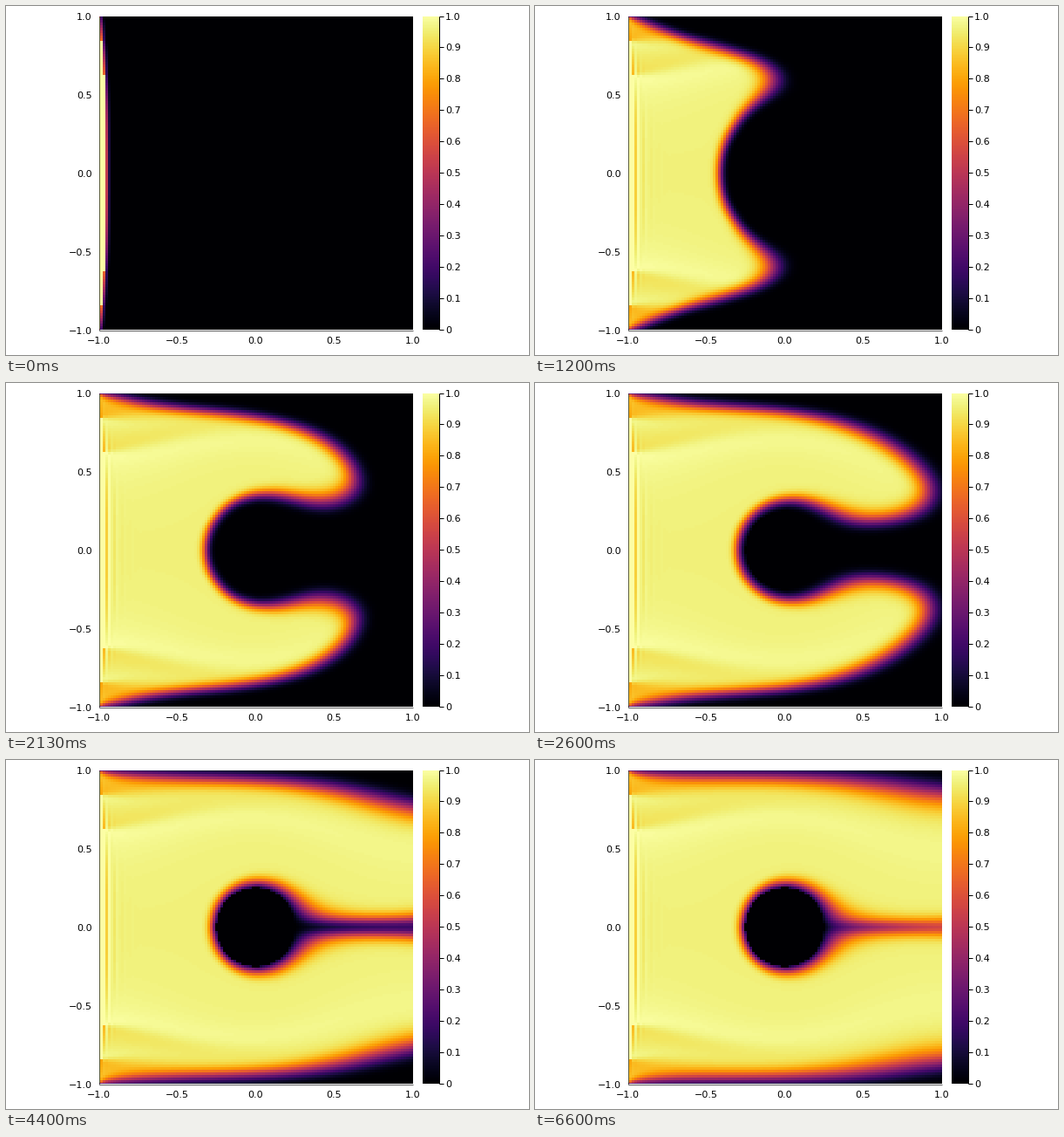
Recreate the animation shown at these times as a matplotlib script. Size 600x400 px, loop 6670 ms.

```python
import numpy as np
import matplotlib.pyplot as plt
from matplotlib.animation import FuncAnimation

W, H = 600, 400
FRAMES, LOOP = 100, 6670
N = 120                # grid intervals per side
D = 2 / N
R = 0.25               # cylinder radius
U, P = 0.0452, 2.8     # inlet speed per frame and profile power
K = 0.165              # diffusion per frame, in cells squared


# Stokes flow past a cylinder in a channel, as a series fitted to its walls
def basis(x, y):
    r = np.maximum(np.hypot(x, y), 0.2)
    t = np.arctan2(y, x)
    cols = []
    for n in range(1, 32, 2):
        s = np.sin(n * t)
        grow, decay = (r / 1.2) ** n, (R / r) ** n
        last = r * np.log(r) if n == 1 else decay * r * r
        cols += [grow * s, grow * r * r * s, decay * s, last * s]
    return np.stack(cols, axis=-1)


def flow_basis(x, y, h=1e-4):
    u = (basis(x, y + h) - basis(x, y - h)) / (2 * h)
    v = (basis(x - h, y) - basis(x + h, y)) / (2 * h)
    return u, v


def fit_flow():
    s = np.linspace(0, 1, 90)
    one, zero = np.ones_like(s), np.zeros_like(s)
    a = s * np.pi / 2
    x = np.concatenate([R * np.cos(a), s, one])
    y = np.concatenate([R * np.sin(a), one, s])
    psi = np.concatenate([zero, one - 1 / (P + 1), s - s ** (P + 1) / (P + 1)])
    u = np.concatenate([zero, zero, 1 - s ** P])
    A = np.concatenate([basis(x, y), *flow_basis(x, y)])
    b = np.concatenate([psi, u, np.zeros_like(u)])
    scale = np.linalg.norm(A, axis=0)
    return np.linalg.lstsq(A / scale, b, rcond=None)[0] / scale


coef = fit_flow()


def in_cylinder(x, y):
    return np.hypot(x, y) < R + 0.001


def velocity(x, y):
    x, y = np.clip(x, -1, 1), np.clip(y, -1, 1)
    u, v = (U * (f @ coef) for f in flow_basis(x, y))
    still = in_cylinder(x, y) | (np.abs(y) > 1 - 1e-9)
    return np.where(still, 0, u), np.where(still, 0, v)


def cell(p):
    g = np.clip((p + 1) / D, 0, N)
    i = np.minimum(g.astype(int), N - 1)
    return i, g - i


def diffuse(c):
    p = np.pad(c, 1)
    around = p[:-2, 1:-1] + p[2:, 1:-1] + p[1:-1, :-2] + p[1:-1, 2:]
    return c + K * (around - 4 * c)


# Diffusion, then semi-Lagrangian transport of the dye, once per frame
def simulate():
    axis = np.linspace(-1, 1, N + 1)
    X, Y = np.meshgrid(axis, axis)
    solid = in_cylinder(X, Y)
    u, v = velocity(X, Y)
    u, v = velocity(X - u / 2, Y - v / 2)
    still = solid | (np.abs(Y) > 1 - 1e-9)
    u[still] = v[still] = 0
    px, py = X - u, Y - v
    i, fx = cell(px)
    j, fy = cell(py)
    inflow = px < -1

    c = np.zeros_like(X)
    c[:, 0] = 1
    out = []
    for _ in range(FRAMES):
        src = diffuse(c)
        low = src[j, i] * (1 - fx) + src[j, i + 1] * fx
        high = src[j + 1, i] * (1 - fx) + src[j + 1, i + 1] * fx
        c = low * (1 - fy) + high * fy
        c[inflow] = 1
        c[solid] = 0
        out.append(c)
    return out


dye = simulate()

plt.rcParams["font.family"] = "DejaVu Sans"
fig = plt.figure(figsize=(W / 100, H / 100), dpi=100, facecolor="white")


def panel(x0, y0, x1, y1):
    ax = fig.add_axes([x0 / W, 1 - y1 / H, (x1 - x0) / W, (y1 - y0) / H])
    ax.set_xticks([])
    ax.set_yticks([])
    for side in ax.spines.values():
        side.set_visible(False)
    return ax


def line(x0, y0, x1, y1, lw=0.72):
    fig.add_artist(plt.Line2D([x0 / W, x1 / W], [1 - y0 / H, 1 - y1 / H],
                              color="black", lw=lw, solid_capstyle="butt"))


def label(x, y, s, ha):
    fig.text(x / W, 1 - y / H, s, ha=ha, va="center_baseline",
             fontsize=8, color="black")


ax = panel(106.5, 11.5, 466.5, 371.5)
image = ax.imshow(dye[0], cmap="inferno", vmin=0, vmax=1, origin="lower",
                  interpolation="nearest", aspect="auto",
                  extent=[-1 - D / 2, 1 + D / 2, -1 - D / 2, 1 + D / 2])
ax.set_xlim(-1, 1)
ax.set_ylim(-1, 1)

bar = panel(478, 11.5, 497, 371)
bar.imshow(np.linspace(0, 1, 256)[:, None], cmap="inferno", origin="lower",
           aspect="auto", interpolation="nearest")

line(106.5, 12, 106.5, 372, 0.45)
line(106.5, 371.5, 466.5, 371.5, 0.45)
line(497, 12, 497, 371)

for val in np.linspace(-1, 1, 5):
    text = f"{val:.1f}".replace("-", "\u2212")
    label(98.7, 192 - 180 * val, text, "right")
    label(286.5 + 180 * val, 383, text, "center")

for n in range(11):
    y = 371 - 35.95 * n
    line(497, y, 502, y)
    label(504.3, y, f"{n / 10:.1f}" if n else "0", "left")


def draw(k):
    image.set_data(dye[k])
    return [image]


anim = FuncAnimation(fig, draw, frames=FRAMES, interval=LOOP / FRAMES,
                     repeat=True, repeat_delay=0, blit=False)
plt.show()
```
